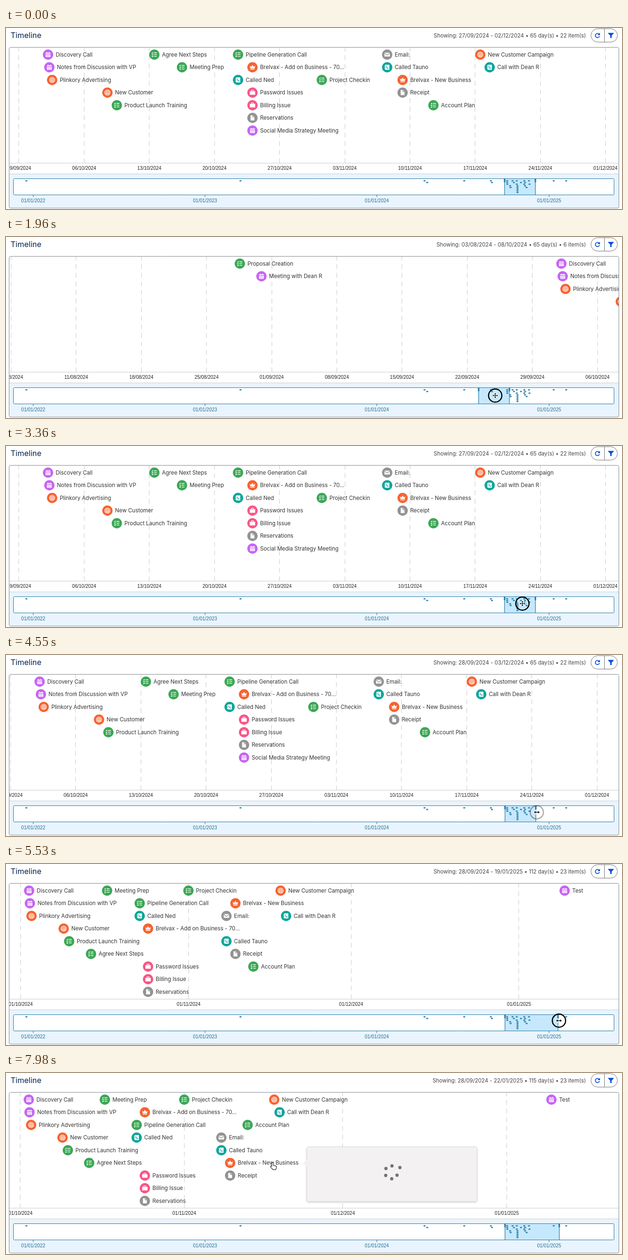
Recreate the animation shown at these times as an HTML page with a canvas. Size 1280 px wide and 379 px high, loop 8 s.

```html
<!DOCTYPE html>
<html lang="en">
<head>
<meta charset="utf-8">
<title>Timeline</title>
<style>
  html, body { margin: 0; width: 100%; height: 100%; overflow: hidden; background: #fff; }
  canvas { display: block; width: 1280px; height: 379px; }
</style>
</head>
<body>
<canvas id="stage"></canvas>
<script>
const LOOP = 8000, STEP = 70;
const LEFT = 6, RIGHT = 1273, DAY_MS = 864e5;
const ROW_TOP = 55.7, ROW_HEIGHT = 26.5;
const SANS = 'Inter, Roboto, sans-serif', ARIAL = '"Liberation Sans", Arial, sans-serif';

const canvas = document.getElementById('stage');
const ctx = canvas.getContext('2d');
const ratio = window.devicePixelRatio || 1;
canvas.width = 1280 * ratio;
canvas.height = 379 * ratio;

// Icon: disc colour, white fill, white strokes, strokes in the disc colour.
const icon = (color, fill, lines, cuts) =>
  ({ color, fill: new Path2D(fill), lines: new Path2D(lines), cuts: new Path2D(cuts) });
const ICONS = {
  event: icon('#c565f3', 'M-5-4h10v9.2h-10z', 'M-2.5-3.5v-2M2.5-3.5v-2',
    'M-5-1.5h10M-3.4.9h1.5M-.75.9h1.5M1.9.9h1.5M-3.4 3.3h1.5M-.75 3.3h1.5M1.9 3.3h1.5'),
  task: icon('#3ba755', '', 'M-.8-3.7h6M-.8 0h6M-.8 3.7h6M-5.3-3.8l1.1 1 1.8-2M-5.3-.1l1.1 1 1.8-2M-5.3 3.6l1.1 1 1.8-2', ''),
  campaign: icon('#f8622f', 'M1.2 0a1.2 1.2 0 1 1-2.4 0a1.2 1.2 0 1 1 2.4 0',
    'M5.4 0a5.4 5.4 0 1 1-10.8 0a5.4 5.4 0 1 1 10.8 0M3 0a3 3 0 1 1-6 0a3 3 0 1 1 6 0', ''),
  deal: icon('#f8622f', 'M-5.6-3.2l2.9 2.3L0-5l2.7 4.1 2.9-2.3-1.1 5.4h-9zM-4.5 3.3h9v1.6h-9z', '', ''),
  call: icon('#0ca59b', 'M-4-5.3h8.6v10.6h-8.6z', 'M-5.6-2.8h2M-5.6 0h2M-5.6 2.8h2', 'M-1.8-2.6q.2 4.4 4.4 5.2M-2-2.7l1 1.3M1.5 1.6l1.2 1'),
  case: icon('#f95587', 'M-5.6-2.8h11.2v7.4h-11.2z', 'M-2-2.8v-2h4v2', ''),
  email: icon('#939393', 'M-5.6-4h11.2v8h-11.2z', '', 'M-5.4-3.2l5.4 4.2 5.4-4.2'),
  file: icon('#939393', 'M-4-5.4h4.8l3.2 3.2v7.6h-8z', '', 'M.6-5.6v3.6h3.6')
};

// Days count from 1 October 2024.
const BASE = Date.UTC(2024, 9, 1);
const ITEMS = [
  [-1021, 'event', 'Kickoff'], [-566, 'event', 'Review'], [-175, 'event', 'Workshop'],
  [-169.3, 'event', 'Follow Up'], [-90.6, 'event', 'Planning'],
  [-34.03, 'task', 'Proposal Creation'], [-31.71, 'event', 'Meeting with Dean R'],
  [.51, 'event', 'Discovery Call'], [.65, 'event', 'Notes from Discussion with VP'],
  [.95, 'campaign', 'Plinkory Advertising'], [6.89, 'campaign', 'New Customer'],
  [7.9, 'task', 'Product Launch Training'], [11.93, 'task', 'Agree Next Steps'],
  [14.9, 'task', 'Meeting Prep'], [20.92, 'task', 'Pipeline Generation Call'],
  [20.92, 'call', 'Called Ned'], [22.47, 'deal', 'Brelvax - Add on Business - 70...'],
  [22.47, 'case', 'Password Issues'], [22.47, 'case', 'Billing Issue'],
  [22.47, 'file', 'Reservations'], [22.47, 'event', 'Social Media Strategy Meeting'],
  [29.92, 'task', 'Project Checkin'], [36.94, 'email', 'Email:'], [36.94, 'call', 'Called Tauno'],
  [38.6, 'deal', 'Brelvax - New Business'], [38.6, 'file', 'Receipt'],
  [41.91, 'task', 'Account Plan'], [46.94, 'campaign', 'New Customer Campaign'],
  [47.95, 'call', 'Call with Dean R'], [99.38, 'event', 'Test'], [126, 'event', 'Renewal']
].map(([day, kind, label]) => ({ day, kind, label }));

// Motion keys: time, value.
const SPAN = 65.5;
const START = [[1400, -3.085], [1470, -5], [1610, -18], [1750, -38], [1890, -54], [1960, -58.23],
  [2100, -60.5], [2240, -61], [2590, -61], [2660, -59], [2800, -50.1], [3010, -28], [3220, -8],
  [3360, -3.085], [3500, -2.18]];
const END = [[4760, SPAN - 2.18], [4900, 74], [5040, 91.4], [5250, 103], [5530, 110.4], [5600, 113.17]];
const CURSOR_X = [[350, 1070], [1120, 1073], [1400, 1073], [1540, 1060], [1680, 1041], [1820, 1024],
  [1960, 1016.5], [2590, 1016.5], [2800, 1033], [3010, 1052], [3220, 1068], [3360, 1073], [3990, 1073],
  [4200, 1103], [4760, 1103], [4900, 1116], [5040, 1132], [5250, 1142], [5530, 1149], [5600, 1151],
  [6300, 1151], [6510, 1050], [6720, 800], [6930, 625], [7140, 554]];
const CURSOR_Y = [[350, 386], [840, 345], [1120, 332], [2800, 332], [3360, 330], [5040, 329],
  [5530, 328], [6300, 329], [6510, 305], [6720, 250], [6930, 205], [7140, 188]];
const RING = [[1190, 0], [1330, 1], [3710, 1], [3920, 0], [4480, 0], [4690, 1], [5950, 1], [6160, 0]];

function at(t, keys) {
  const next = keys.findIndex(([time]) => time > t);
  if (next === 0) return keys[0][1];
  if (next < 0) return keys[keys.length - 1][1];
  const [t0, a] = keys[next - 1], [t1, b] = keys[next];
  return a + (b - a) * (t - t0) / (t1 - t0);
}

const dateOf = day => new Date(BASE + Math.floor(day) * DAY_MS);
function dateText(day) {
  const d = dateOf(day);
  const two = n => String(n).padStart(2, '0');
  return `${two(d.getUTCDate())}/${two(d.getUTCMonth() + 1)}/${d.getUTCFullYear()}`;
}
const overviewX = day => 1129 + (day - 92) * .978;

// Puts each item in the first row that is free at its left edge.
function pack(items, leftOf, widthOf) {
  const ends = [];
  return items.map(item => {
    const x = leftOf(item.day);
    let row = ends.findIndex(end => end <= x);
    if (row < 0) row = ends.length;
    ends[row] = x + widthOf(item.label.length);
    return { ...item, x, row };
  });
}
const DOTS = pack(ITEMS, overviewX, n => 6.6 + .12 * n);

function text(str, x, y, size, color, align = 'left', family = SANS) {
  ctx.font = `${size}px ${family}`;
  ctx.fillStyle = color;
  ctx.textAlign = align;
  ctx.fillText(str, x, y);
}
function line(x1, y1, x2, y2, color, width = 1) {
  ctx.strokeStyle = color;
  ctx.lineWidth = width;
  ctx.beginPath();
  ctx.moveTo(x1, y1);
  ctx.lineTo(x2, y2);
  ctx.stroke();
}
function box(x, y, w, h, r, fill, stroke) {
  ctx.beginPath();
  ctx.roundRect(x, y, w, h, r);
  if (fill) { ctx.fillStyle = fill; ctx.fill(); }
  if (stroke) { ctx.strokeStyle = stroke; ctx.lineWidth = 1; ctx.stroke(); }
}
function disc(x, y, r, color) {
  ctx.fillStyle = color;
  ctx.beginPath();
  ctx.arc(x, y, r, 0, 7);
  ctx.fill();
}
function paint(path, x, y, fill, stroke, width) {
  ctx.save();
  ctx.translate(x, y);
  if (stroke) { ctx.strokeStyle = stroke; ctx.lineWidth = width; ctx.stroke(path); }
  if (fill) { ctx.fillStyle = fill; ctx.fill(path); }
  ctx.restore();
}

const REFRESH = new Path2D('M3.4-2.6A4.4 4.4 0 1 0 4.2 1.6');
const REFRESH_TIP = new Path2D('M5.2-5.4v5h-5z');
const FUNNEL = new Path2D('M-5.6-5.2h11.2q.6.6 0 1.2L1.5.6v4.8h-3V.6l-4.1-4.6q-.6-.6 0-1.2z');

function drawHeader(start, end, count) {
  text('Timeline', 9.5, 20.5, 16, '#03234d');
  text(`Showing: ${dateText(start)} - ${dateText(end)} • ${Math.floor(end - start)} day(s) • ${count} item(s)`,
    1205, 19.5, 11.2, '#444', 'right');
  box(1215.5, 1.5, 55, 28, 14, '#fff', '#747474');
  line(1243.5, 1.5, 1243.5, 29.5, '#747474');
  paint(REFRESH, 1229, 15.5, null, '#0250d9', 1.7);
  paint(REFRESH_TIP, 1229, 15.5, '#0250d9');
  paint(FUNNEL, 1257, 15.5, '#0250d9');
}

function drawTicks(start, end, toX) {
  const monthly = end - start > 85;
  for (let day = Math.floor(start); day < end; day++) {
    const date = dateOf(day);
    if (monthly ? date.getUTCDate() !== 1 : date.getUTCDay() !== 0) continue;
    const x = toX(day);
    if (x < LEFT) continue;
    const lineX = Math.floor(x) + .5;
    ctx.setLineDash([10, 8]);
    line(lineX, 283, lineX, 41, '#cbcbcb');
    ctx.setLineDash([]);
    text(dateText(day), x, 297, 10, '#222', 'center', ARIAL);
  }
}

function drawItem({ x, row, kind, label }) {
  const { color, fill, lines, cuts } = ICONS[kind];
  const cx = x + 11.8, cy = ROW_TOP + row * ROW_HEIGHT;
  disc(cx, cy, 10.7, color);
  paint(fill, cx, cy, '#fff');
  paint(lines, cx, cy, null, '#fff', 1.3);
  paint(cuts, cx, cy, null, color, 1.2);
  text(label, cx + 15.8, cy + 3.8, 11.3, '#333');
}

function drawChart(start, end, items) {
  const toX = day => LEFT + (day - start) * (RIGHT - LEFT) / (end - start);
  ctx.save();
  ctx.beginPath();
  ctx.rect(LEFT, 41, RIGHT - LEFT, 264);
  ctx.clip();
  drawTicks(start, end, toX);
  pack(items, toX, n => 68.5 + 5.4 * n).filter(item => item.row < 9).forEach(drawItem);
  ctx.restore();
  line(LEFT, 283, RIGHT, 283, '#c9c9c9');
}

function drawOverview(start, end) {
  const x1 = overviewX(start), x2 = overviewX(end);
  box(7, 306, 1266, 71, 0, '#e9f4fe');
  line(LEFT, 305.5, RIGHT, 305.5, '#c9cfd4');
  box(15.5, 315.5, 1248, 34, 2, '#fff', '#2578a0');
  box(x1, 316, x2 - x1, 33, 0, '#c6e8fd');
  for (const x of [x1, x2]) {
    line(x, 315.5, x, 349.5, '#1f7ba6', 1.2);
    line(x, 315.5, x, 323, '#1f7ba6', 3);
  }
  for (const { x, row } of DOTS) box(x - .2, 318.8 + row * 3.5, 4, 2.5, .5, '#2b80a9');
  for (let year = 2022; year <= 2025; year++) {
    const x = overviewX((Date.UTC(year, 0, 1) - BASE) / DAY_MS) - .5;
    line(x, 350, x, 354, '#2578a0');
    text(`01/01/${year}`, x, 365, 10, '#24708f', 'center', ARIAL);
  }
  box(6.5, 40.5, 1267, 336.5, 3, null, '#858b90');
}

function drawPopup(t) {
  ctx.save();
  ctx.shadowColor = 'rgba(0,0,0,.22)';
  ctx.shadowBlur = 4;
  ctx.shadowOffsetY = 1.5;
  box(625, 154.5, 353.5, 114.5, 4, '#f3f1f2');
  ctx.restore();
  box(625, 154.5, 353.5, 114.5, 4, null, '#dddbda');
  paint(new Path2D('M0-8l-8 8 8 8z'), 625.5, 189, '#f3f1f2');
  const swing = at(t, [[7560, 0], [7980, 1]]);
  const dots = [[789.5, 200], [802, 194.5], [813 + 5.5 * swing, 200.5 - 2.5 * swing],
    [812.5, 214], [801.5, 221.5], [789, 214.5]];
  for (const [x, y] of dots) disc(x, y, 3.4, '#747274');
}

const CURSORS = {
  arrow: new Path2D('M0 0v13l3-2.8 2 4.6 2.2-1-2-4.4h4.2z'),
  move: new Path2D('M0-5.6l2 2.3H.6v2.7h2.7v-1.4L5.6 0 3.3 2V.6H.6v2.700H2L0 5.600l-2-2.300h1.400V.6h-2.700V2L-5.600 0l2.300-2v1.400h2.700v-2.700H-2z'),
  resize: new Path2D('M-5.8 0l3-2.8v2h5.6v-2l3 2.8-3 2.8v-2h-5.6v2z'),
  hand: new Path2D('M-1 8V1.2Q-1-.2.2-.2T1.4 1.2V6L6 7q1.8.5 1.5 2.4l-.7 3.2Q6.5 14 5.2 14H1.8q-1 0-1.6-.9L-3.7 9q-.5-1 .3-1.6t1.7.2z')
};
function cursorKind(t, y) {
  if (t >= 7210) return 'hand';
  if (t >= 6370 || y > 350) return 'arrow';
  return t >= 4340 ? 'resize' : 'move';
}
function drawCursor(t) {
  if (t < 420) return;
  const x = at(t, CURSOR_X), y = at(t, CURSOR_Y), kind = cursorKind(t, y);
  ctx.globalAlpha = at(t, RING);
  ctx.strokeStyle = '#000';
  ctx.lineWidth = 2.4;
  ctx.beginPath();
  ctx.arc(x, y, 13.8, 0, 7);
  ctx.stroke();
  ctx.globalAlpha = 1;
  if (kind === 'hand') paint(CURSORS.hand, x, y, '#fff', '#000', 2);
  else paint(CURSORS[kind], x, y, '#000', '#fff', 2);
}

function draw(now) {
  const t = Math.floor(now % LOOP / STEP) * STEP;
  const start = at(t, START);
  const end = t < 4760 ? start + SPAN : at(t, END);
  const items = ITEMS.filter(({ day }) => day >= start && day <= end);
  ctx.setTransform(ratio, 0, 0, ratio, 0, 0);
  ctx.fillStyle = '#fff';
  ctx.fillRect(0, 0, 1280, 379);
  drawHeader(start, end, items.length);
  drawChart(start, end, items);
  drawOverview(start, end);
  if (t >= 7000) drawPopup(t);
  drawCursor(t);
  requestAnimationFrame(() => draw(performance.now() - began));
}
const began = performance.now();
draw(0);
</script>
</body>
</html>
```
